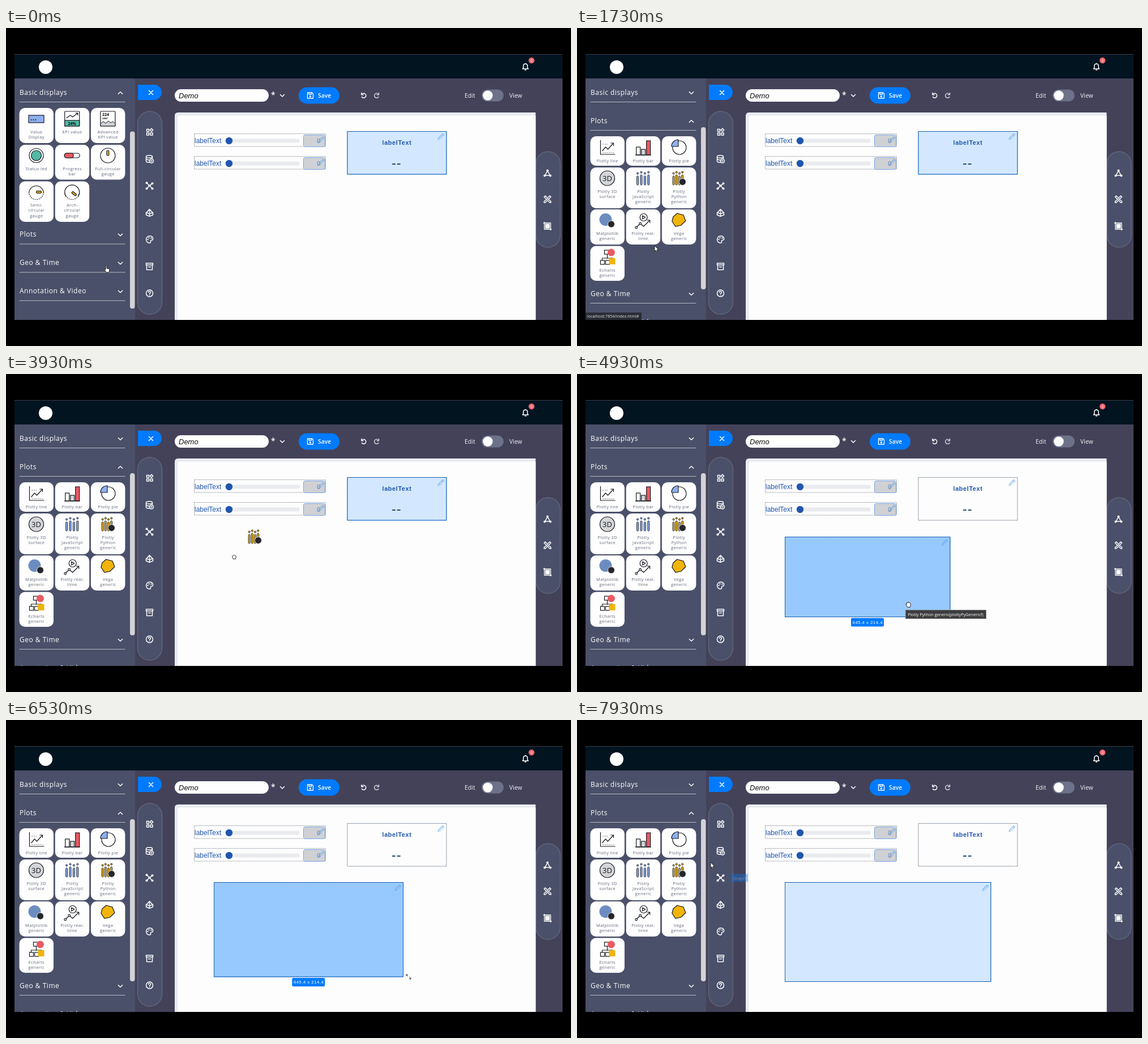
Animation, 998 px wide and 561 px high, one loop 8 s. Source, as an HTML page:

```html
<!DOCTYPE html>
<html lang="en">
<head>
<meta charset="utf-8">
<title>Dashboard editor</title>
<style>
html, body { margin: 0; width: 100%; height: 100%; overflow: hidden; background: #000; }
svg { display: block; width: 100%; height: 100%; }
text { font-family: "Open Sans", "Noto Sans", sans-serif; }
.head { font-size: 12px; letter-spacing: .5px; fill: #fff; }
.tile { font-size: 7.5px; letter-spacing: .4px; fill: #62687c; text-anchor: middle; }
.label { font-family: "Liberation Sans", Arial, sans-serif; fill: #2056ae; }
.ui { fill: none; stroke: #fff; stroke-width: 1.5; stroke-linecap: round; stroke-linejoin: round; }
.ink { fill: none; stroke: #16181d; stroke-width: 1.2; stroke-linejoin: round; }
.dots { fill: none; stroke: #777c86; stroke-dasharray: 1.4 1.4; }
</style>
</head>
<body>
<svg id="stage" viewBox="0 0 998 561" xmlns="http://www.w3.org/2000/svg"></svg>
<script>
const stage = document.getElementById('stage');
const BLUE = '#007bff', GOLD = '#f0b40a', RED = '#ea5a62', SKY = '#8fb0f0', TEAL = '#52b8a4';

// Markup helpers
const rect = (x, y, w, h, fill, rx = 0, more = '') =>
  `<rect x="${x}" y="${y}" width="${w}" height="${h}" rx="${rx}" fill="${fill}" ${more}/>`;
const dot = (x, y, r, fill, more = '') => `<circle cx="${x}" cy="${y}" r="${r}" fill="${fill}" ${more}/>`;
const path = (d, cls = 'ink', more = '') => `<path d="${d}" class="${cls}" ${more}/>`;
const text = (x, y, s, cls, more = '') => `<text x="${x}" y="${y}" class="${cls}" ${more}>${s}</text>`;
const at = (x, y, body, more = '') => `<g transform="translate(${x} ${y})" ${more}>${body}</g>`;
const inked = 'stroke="#16181d" stroke-width="1.2"';

// Tile icons, centred on 0,0
const columns = (fill, gap) => [0, 1, 2, 3].map(i => {
  const x = (i - 1.5) * gap, top = i % 2 ? -5 : -3;
  return rect(x - 1.5, top, 3, 13 - top, fill, 1.4, 'stroke="#16181d" stroke-width=".9"') +
    dot(x, top - 4.5, 1.6, fill, 'stroke="#16181d" stroke-width=".9"');
}).join('');
const badge = (x, y) => dot(x, y, 6, '#24262b', 'stroke="#fff" stroke-width=".8"');
const gauge = (start, needle) =>
  path(start) + path('M-12.5 3A12.8 12.8 0 0 0 12.5 3', 'ink', 'stroke-dasharray="2 1.6"') +
  `<g transform="rotate(${needle})">${rect(0, -1.8, 9, 3.6, GOLD, 1.5, inked)}</g>`;

const icons = {
  value: rect(-13.5, -7, 27, 13, SKY, 0, inked) + [-9, -5, -1].map(x => dot(x, 1, 1.1, '#16181d')).join(''),
  kpi: rect(-13, -14, 26, 26, '#fff', 1, inked) + rect(-13, 2, 26, 10, TEAL, 0, inked) +
    path('M-10 -2L-3 -7L1 -4L10 -11M6 -11H10V-7') +
    text(0, 10, '24%', '', 'font-size="7" font-weight="700" text-anchor="middle"'),
  advanced: rect(-13, -14, 26, 26, '#fff', 1, inked) +
    text(-10, -6, '224', '', 'font-size="7" font-weight="700"') +
    text(-10, 0, 'UNIT', '', 'font-size="4" font-weight="700"') +
    path('M-13 8L-8 4L-4 7L1 3L5 6L9 4L13 8V12H-13Z', '', 'fill="#cfd2d6" stroke="#16181d"'),
  led: dot(0, 0, 12.5, '#fff', inked) + dot(0, 0, 9, TEAL, inked),
  progress: rect(-13.5, -4, 27, 8, '#fff', 4, inked) + rect(-13.5, -4, 16, 8, RED, 4, inked),
  full: dot(0, 0, 13, '#fff', inked) + rect(-1.9, -9, 3.8, 9, GOLD, 1.5, inked),
  semi: gauge('M-13 2A13 13 0 0 1 13 2', 0),
  arch: gauge('M-10.5 8A13 13 0 1 1 10.5 8', 38),
  line: path('M-12 -13V12H14') + path('M-9 6L-3 -1L1 3L11 -8M6 -8H11V-3') +
    path('M-8 9H12M-8 -6H2', 'ink', 'stroke-dasharray="1.5 2" style="stroke-width:.8"'),
  bars: rect(-12, -1, 7, 14, '#fff', 0, inked) + rect(-3, 3, 7, 10, '#d5d8dc', 0, inked) +
    rect(6, -12, 7, 25, RED, 0, inked) + path('M-14 13H14'),
  pie: dot(1, 1, 12, '#fff', inked) + path('M-1 -1V-13A12 12 0 0 0 -13 -1Z', '', `fill="${SKY}" ${inked}`),
  surface: dot(0, 0, 13, '#d3d5d9', inked) +
    text(0, 5, '3D', '', 'font-size="13" text-anchor="middle" fill="#16181d"'),
  script: columns(SKY, 6.4),
  python: at(-1.5, -2, columns(GOLD, 5.2)) + badge(6.5, 5.5),
  matplot: dot(-3, -1, 11, '#6c8cc0') + badge(7, 7),
  real: path('M-12 12L-5 5L1 10L12 -1M7 -1H12V4') + dot(-12, 12, 1.8, '#fff', inked) +
    dot(-5, 5, 1.8, '#fff', inked) + dot(1, -6, 6.5, '#fff', inked) + path('M-1 -9V-3L4 -6Z'),
  vega: path('M-3 -12L8 -9L12 1L4 9L-6 11L-12 2L-10 -6Z', '', `fill="${GOLD}" ${inked}`),
  echarts: path('M0 -5V3M-9 7V2H10V7') + rect(-5, -12, 10, 7, '#fff', 0, inked) +
    rect(-12, 6, 7, 7, '#fff', 0, inked) + rect(-3, 6, 7, 7, '#fff', 0, inked) +
    dot(7, -8, 6.5, RED) + rect(3, 2, 11, 11, GOLD)
};

const tile = (col, y, h, icon, iconY, lines, textY) => {
  const x = 23.5 + col * 63.2;
  return rect(x, y, 60.5, h, '#fefefe', 10) + at(x + 30, iconY, icons[icon]) +
    lines.split('|').map((s, i) => text(x + 30.3, textY + i * 9.3, s, 'tile')).join('');
};
const header = (label, y, id) => text(24, y + 4, label, 'head') +
  rect(23.5, y + 16.5, 187, 1, '#b6bac8') +
  at(202, y + 1, `<path id="${id}" class="ui" d="M-3.7 -1.8L0 1.8L3.7 -1.8"/>`);

const basicTiles =
  tile(0, 141, 62, 'value', 161, 'Value|Display', 186) +
  tile(1, 141, 62, 'kpi', 161, 'KPI value', 186) +
  tile(2, 141, 62, 'advanced', 161, 'Advanced|KPI value', 186) +
  tile(0, 206, 61.5, 'led', 225, 'Status led', 250.5) +
  tile(1, 206, 61.5, 'progress', 225, 'Progress|bar', 250.5) +
  tile(2, 206, 61.5, 'full', 225, 'Full-circular|gauge', 250.5) +
  tile(0, 270.5, 71.5, 'semi', 289.5, 'Semi-|circular|gauge', 315) +
  tile(1, 270.5, 71.5, 'arch', 289.5, 'Arch-|circular|gauge', 315);
const plotTiles =
  tile(0, 191, 52, 'line', 211, 'Plotly line', 236.5) +
  tile(1, 191, 52, 'bars', 211, 'Plotly bar', 236.5) +
  tile(2, 191, 52, 'pie', 210, 'Plotly pie', 236.5) +
  tile(0, 246, 72, 'surface', 265, 'Plotly 3D|surface', 290.5) +
  tile(1, 246, 72, 'script', 264, 'Plotly|JavaScript|generic', 290.5) +
  tile(2, 246, 72, 'python', 266, 'Plotly|Python|generic', 290.5) +
  tile(0, 320, 62, 'matplot', 339, 'Matplotlib|generic', 365) +
  tile(1, 320, 62, 'real', 340, 'Plotly real-|time', 365) +
  tile(2, 320, 62, 'vega', 339, 'Vega|generic', 365) +
  tile(0, 384.5, 61.5, 'echarts', 404, 'Echarts|generic', 429.5);

const pencil = (x, y) => at(x, y,
  path('M-5.5 5.5L-4.5 2.5L3 -5L5.5 -2.5L-2 5ZM1.5 -3.5L4 -1M-4 3.5L3.5 -3.5', '',
    'fill="none" stroke="#5fa3ec" opacity=".8"'));

const slider = y =>
  rect(332.5, y - 12.5, 232, 22.5, 'none', 0, 'class="dots"') +
  text(333, y + 4.2, 'labelText', 'label', 'font-size="12"') +
  rect(394, y - 3.5, 125, 7, '#e9ebef', 3.5) + dot(394, y, 6.2, '#2056ae') +
  rect(525.5, y - 10.5, 38, 21, '#cfd1d5', 3, 'stroke="#78a5e6"') +
  text(549, y + 4, '0', 'label', 'font-size="11.5" style="fill:#6f86a8"') + pencil(557, y - 3);

const frame = (id, x, y, w, h) =>
  rect(x, y, w, h, BLUE, 0, `id="${id}" stroke="${BLUE}"`) +
  rect(x, y, w, h, 'none', 0, `id="${id}Dots" class="dots" style="stroke:#34495f"`);

const pill = (x, y, w, h) => rect(x, y, w, h, '#4a506a', w / 2, 'stroke="#5f6579" stroke-width="1.5"');

const tools = [
  path('M-5 -5H-1V-1H-5ZM-5 1.5H-1V5.5H-5ZM1.5 1.5H5.5V5.5H1.5ZM3.5 -6.3L6.2 -3.5L3.5 -.8L.8 -3.5Z', 'ui'),
  path('M-6 -4C-6 -7 5 -7 5 -4S-6 -1 -6 -4V4C-6 6 -2 6.5 0 6M5 -4V-1M-6 0C-5 2 -2 2 0 2', 'ui') +
    dot(3.5, 3.5, 3.5, '#4a506a', 'class="ui"') + path('M3.5 2V5M2 3.5H5', 'ui', 'style="stroke-width:1"'),
  path('M0 0L-5 -5M0 0L5 -4M0 0L-5 5M0 0L5 5', 'ui') +
    [[0, 0], [-5, -5], [5, -4], [-5, 5], [5, 5]].map(p => dot(...p, 2, '#fff')).join(''),
  path('M-6 0L0 2L6 0V4L0 6.5L-6 4ZM0 2V6M0 0V-6M-3 -3L0 -6L3 -3M-6 0L-3 -2M6 0L3 -2', 'ui'),
  path('M1 6C-8 7 -8 -6 0 -6C7 -6 8 1 3 1.5C0 2 4 5 1 6Z', 'ui') +
    [[-3, 0], [-1, -3], [3, -2.5]].map(p => dot(...p, 1.2, '#fff')).join(''),
  path('M-6 -5.5H6V-2.5H-6ZM-5 -2.5V6H5V-2.5M-2 1H2', 'ui'),
  dot(0, 0, 6, 'none', 'class="ui"') + path('M-2 -1.5C-2 -4 2 -4 2 -1.5C2 0 0 0 0 1.5M0 3.5V3.6', 'ui')
].map((icon, i) => at(253.5, 183.5 + i * 47.4, icon)).join('');

const sideTools =
  at(956.5, 256, path('M0 -4L-4.5 4H4.5Z', 'ui') + dot(0, -4.5, 2, '#fff') + dot(-5, 4.5, 2, '#fff') + dot(5, 4.5, 2, '#fff')) +
  at(956.5, 302, path('M-6 -4L-4 -6L6 4V6H4ZM6 -4L4 -6L-6 4V6H-4Z', 'ui')) +
  at(956.5, 349.5, rect(-4, -4, 8, 8, '#fff') + path('M-5.5 -7V5.5H7M-7 -5.5H5.5V7', 'ui', 'style="stroke-width:1.3"'));

const skin = 'fill="#fff" stroke="#111" stroke-width=".9"';
const cursors = {
  arrow: path('M0 0V10L2.3 8L4 11.5L5.6 10.8L4 7.3H7Z', '', skin),
  hand: path('M-1 1C-1 -.6 1 -.6 1 1V5L5 6C6 6.3 6 7 5.8 8L5 12H0L-3 7.5C-3.4 6.5 -2 6 -1 7.5Z', '', skin),
  grab: path('M-2.5 2L-4 0C-4.5 -1 -3.3 -1.6 -2.6 -.6L-2.6 -3C-2 -4 -1.2 -4 -1 -3C-.6 -5 .8 -5 1 -3.4C1.6 -4.4 2.6 -4 2.7 -3C3.6 -3.4 4.2 -2.6 4.2 -1.6V1L3 4.5H-1Z', '', skin),
  fist: path('M-3 0C-3.6 -2.5 -2 -3 -1 -2.8C0 -3.6 1 -3.4 1.6 -2.8C3 -3 3.6 -2 3.4 0L2.4 3.3H-1.6Z', '', skin),
  resize: path('M-4 -4L-1 -1M1 1L4 4M-4 -1.5V-4H-1.500M4 1.5V4H1.5'.replace('1.500', '1.5'), '',
    'fill="none" stroke="#222" stroke-width="1"')
};

stage.innerHTML = `
<defs>
  <clipPath id="screen"><rect x="15" y="46" width="968" height="469"/></clipPath>
  <clipPath id="basicClip"><rect id="basicBox" x="15" y="132" width="200" height="0"/></clipPath>
  <clipPath id="plotClip"><rect id="plotBox" x="15" y="182" width="200" height="0"/></clipPath>
</defs>
<rect width="998" height="561"/>
<g clip-path="url(#screen)">
  ${rect(15, 46, 968, 470, '#444259')}
  ${rect(15, 89, 213, 427, '#4a5069')}
  ${rect(15, 46, 968, 43, '#021420')}${rect(15, 46, 968, 1, '#3b4046')}
  ${dot(70, 69, 12, '#fff')}
  ${at(917.5, 68, path('M-5 4H5L3.7 2.3V-1C3.7 -6 -3.7 -6 -3.7 -1V2.3ZM-1 6H1M0 -5V-5.5', 'ui'))}
  ${dot(928.3, 57.3, 5.2, '#f0676d')}
  ${text(928.3, 59.6, '0', '', 'font-size="6.5" fill="#fff" text-anchor="middle"')}
  ${header('Basic displays', 113.5, 'basicArrow')}
  <g clip-path="url(#basicClip)">${basicTiles}</g>
  <g id="plots">${header('Plots', 163.5, 'plotArrow')}
    <g clip-path="url(#plotClip)">${plotTiles}</g></g>
  <g id="rest">${header('Geo &amp; Time', 414, 'geoArrow')}${header('Annotation &amp; Video', 464, 'noteArrow')}</g>
  <rect id="thumb" x="219" width="8.5" rx="4" fill="#d3d3d6"/>
  <path d="M233 100H261.5A13.5 13.5 0 0 1 261.5 127H233Z" fill="${BLUE}"/>
  ${path('M252.5 110.5L259.5 117.5M259.5 110.5L252.5 117.5', 'ui')}
  ${pill(232.5, 147, 43, 358)}${tools}
  ${pill(936, 218, 43, 169)}${sideTools}
  ${rect(298, 108, 166, 22, '#fefefe', 11)}
  ${text(305, 123.5, 'Demo', 'label', 'font-size="13" font-style="italic" style="fill:#111"')}
  ${text(468, 123, '*', 'head', 'style="font-size:14px" font-weight="600"')}
  ${path('M484.5 117.5L488 121L491.5 117.5', 'ui')}
  ${rect(517, 104.5, 72, 29, BLUE, 14.5)}
  ${at(537.5, 119, path('M-5 -5H3L5 -3V5H-5ZM-2.5 -5V-2H2V-5', 'ui', 'style="stroke-width:1.3"') + dot(0, 1.8, 1.7, '#fff'))}
  ${text(551, 122.5, 'Save', '', 'font-size="10.3" font-weight="600" fill="#fff"')}
  ${at(631.5, 119, path('M-3.5 -4.5V-1.3H-.3M-3.3 -1.5A4 4 0 1 1 -3 2.5', 'ui'))}
  ${at(655, 119, path('M3.5 -4.5V-1.3H.3M3.3 -1.5A4 4 0 1 0 3 2.5', 'ui', 'opacity=".75"'))}
  ${text(810, 123, 'Edit', '', 'font-size="10.5" fill="#f2f2f6"')}
  ${rect(840, 108.5, 39, 21, '#6d728a', 10.5)}${dot(851, 119, 8.7, '#fff')}
  ${text(889, 123, 'View', '', 'font-size="10.5" fill="#f2f2f6"')}
  <path d="M298 516V155Q298 149 304 149H935.5V516Z" fill="#e8ebf3"/>
  <path d="M303.5 516V157Q303.5 154.5 306 154.5H935.5V516Z" fill="#fdfdfd"/>
  ${slider(199)}${slider(239)}
  ${frame('card', 603, 182.5, 175, 75.5)}
  ${text(690.5, 206, 'labelText', 'label', 'font-size="11" font-weight="700" letter-spacing=".55" text-anchor="middle"')}
  ${text(681, 246, '--', 'label', 'font-size="24" letter-spacing=".8" style="fill:#1d4267"')}
  ${pencil(768.5, 191)}
  <g id="plotFrame">${frame('area', 367.5, 287.5, 292, 141)}<g id="areaPen">${pencil(0, 0)}</g></g>
  <g id="size">${rect(-29, 0, 58, 15, BLUE, 2)}
    ${text(.2, 10.3, '445.4 x 214.4', 'label', 'font-size="8" letter-spacing=".4" text-anchor="middle" style="fill:#fff"')}</g>
  <g id="tip">${rect(.5, .5, 142, 15, '#3d3d3f', 0, 'stroke="#777"')}
    ${text(4.5, 10.7, 'Plotly Python generic(plotlyPyGenericf)', '', 'font-size="7.4" fill="#fff"')}</g>
  <g id="graph">${rect(272, 271.5, 30, 14, BLUE, 1)}
    ${text(287, 281.5, 'Graph', '', 'font-size="8" fill="#fff" text-anchor="middle"')}</g>
  <g id="ghost">${icons.python}</g>
  <g id="status">${rect(15, 502, 99, 14, '#2b2d36', 1)}
    ${text(18, 511, 'localhost:7854/index.html#', '', 'font-size="7.2" fill="#e2e2e6"')}</g>
  <g id="cursor">${Object.keys(cursors).map(k => `<g id="${k}">${cursors[k]}</g>`).join('')}</g>
</g>`;

const el = id => document.getElementById(id);
const set = (id, attrs) => { for (const k in attrs) el(id).setAttribute(k, attrs[k]); };
const move = (id, x, y) => set(id, { transform: `translate(${x} ${y})` });
const fade = (id, o) => set(id, { opacity: o });
const clamp = v => Math.max(0, Math.min(1, v));
const smooth = p => p * p * (3 - 2 * p);
const linear = p => p;

// Each key: time, then values; eased between neighbours
function track(keys, t, ease = smooth) {
  const i = keys.findIndex(k => k[0] > t);
  if (i < 0) return keys[keys.length - 1].slice(1);
  if (!i) return keys[0].slice(1);
  const a = keys[i - 1], b = keys[i];
  const p = ease((t - a[0]) / (b[0] - a[0]));
  return a.slice(1).map((v, j) => v + (b[j + 1] - v) * p);
}

const pointer = [[60, 177, 419], [530, 160, 362], [1200, 160, 362], [1730, 137, 384], [1800, 137, 384],
  [2600, 168, 282], [2660, 168, 282], [3460, 376, 304], [3660, 400, 313], [3800, 400, 313],
  [3930, 403, 323], [4600, 562, 398], [4930, 585, 407], [5200, 628, 428], [5530, 628, 428],
  [5860, 657, 427], [6060, 659, 429], [6200, 666, 433], [6530, 711, 453], [6800, 736, 464],
  [7000, 736, 464], [7750, 252, 274], [7860, 247, 268], [7930, 236, 251]];
const shapes = [[0, 'hand'], [1450, 'arrow'], [2450, 'hand'], [2660, 'fist'], [4060, 'grab'],
  [5660, 'hand'], [6060, 'resize'], [7060, 'arrow'], [7660, 'hand'], [7860, 'arrow']];
const ghostPath = [[2660, 180, 266], [3460, 414, 282], [3660, 439, 288]];
const corner = [[6200, 659, 428.5], [6530, 701.5, 453], [6800, 731, 461.5]];
const tint = [[4000, .17], [4260, .4], [5600, .4], [5800, .325], [6130, .325], [6260, .4],
  [7060, .4], [7260, .17]];
const bar = [[1000, 0], [1060, 1], [1930, 1], [2130, 0], [2400, 0], [2500, 1], [2730, 1], [2930, 0]];
const graphFade = [[7700, 0], [7780, 1], [7840, 1], [7930, .35]];

function draw(t) {
  const open = smooth(clamp((t - 1000) / 400));
  const plotsY = 200.5 * (1 - open);
  set('basicBox', { height: 212 * (1 - open) });
  set('plotBox', { height: 267 * open });
  move('plots', 0, plotsY);
  move('rest', 0, 54.5 * open);
  set('basicArrow', { transform: `scale(1 ${t < 1060 ? -1 : 1})` });
  set('plotArrow', { transform: `scale(1 ${t < 1060 ? 1 : -1})` });
  set('thumb', { y: 182.5 - 7.5 * open, height: 312.5 - 26.5 * open });
  fade('status', track(bar, t, linear)[0]);

  const [gx, gy] = track(ghostPath, t);
  move('ghost', gx, gy);
  fade('ghost', +(t >= 2660 && t < 4000));

  const placed = t >= 4000;
  set('card', { 'fill-opacity': placed ? 0 : .17, 'stroke-opacity': placed ? 0 : 1 });
  fade('plotFrame', +placed);
  const [right, bottom] = track(corner, t, linear);
  const top = t < 6200 ? 287.5 : 286.5;
  const box = { y: top, width: right - 367.5, height: bottom - top };
  set('area', { ...box, 'fill-opacity': track(tint, t, linear)[0] });
  set('areaDots', box);
  move('areaPen', right - 9.5, top + 9);
  move('size', (367 + right) / 2, bottom + 2);
  fade('size', +(placed && t < 7060));

  const late = t >= 5130;
  move('tip', late ? 623 : 580, late ? 438 : 416);
  fade('tip', +((t >= 4730 && t < 5060) || (t >= 5260 && t < 5430)));
  fade('graph', track(graphFade, t, linear)[0]);

  const [x, y] = track(pointer, t);
  const shape = shapes.filter(s => s[0] <= t).pop()[1];
  move('cursor', x, y);
  for (const k in cursors) fade(k, +(k === shape));
}

const begin = performance.now();
function tick() {
  draw((performance.now() - begin) % 8000);
  requestAnimationFrame(tick);
}
tick();
</script>
</body>
</html>
```
